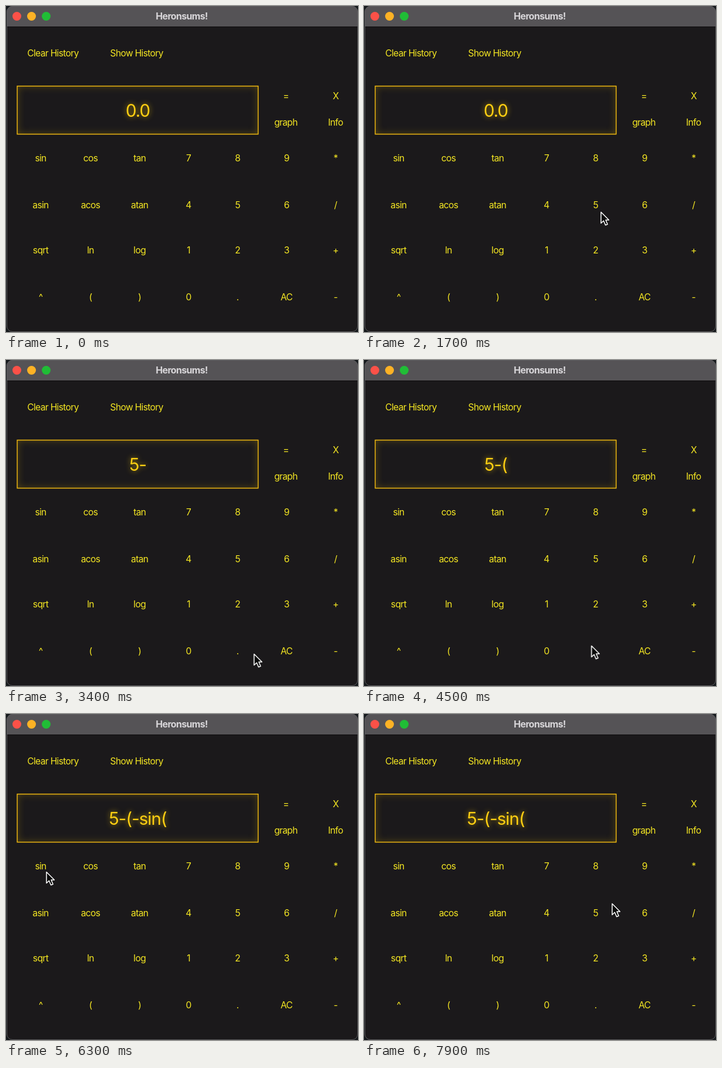
An HTML page that plays this animation: 600 by 556 pixels, repeating every 8 s.

```html
<!DOCTYPE html>
<html lang="en">
<head>
<meta charset="utf-8">
<title>Calculator</title>
<style>
  html, body { margin: 0; width: 100%; height: 100%; overflow: hidden; background: #14181b; }
  body { position: relative; font-family: Inter, Roboto, sans-serif; font-feature-settings: "calt" 0; }
  svg { position: absolute; left: 0; top: 0; display: block; overflow: hidden; }
  text { text-anchor: middle; }
  .title { font-size: 16px; font-weight: 700; letter-spacing: -.7px; fill: #d8d6d9; }
  .key { font-size: 15.6px; letter-spacing: -.67px; fill: #f5e722; }

  .screen {
    position: absolute; left: 19px; top: 136px; width: 411px; height: 83px;
    overflow: hidden; box-shadow: inset 0 0 14px rgba(255, 205, 0, .28);
  }
  .strip { animation: typing 8s step-end infinite; }
  .strip div {
    height: 83px; line-height: 84px; text-align: center;
    font-size: 29.5px; letter-spacing: -1px; color: #ffcf12;
    text-shadow: 0 0 10px rgba(255, 210, 0, .65);
  }
  @keyframes typing {
    0%      { transform: translateY(0); }
    23.75%  { transform: translateY(-83px); }
    36.25%  { transform: translateY(-166px); }
    50%     { transform: translateY(-249px); }
    63.75%  { transform: translateY(-332px); }
    78.75%, 100% { transform: translateY(-415px); }
  }

  .cursor { animation: travel 8s infinite, appear 8s step-end infinite; }
  @keyframes appear {
    0% { opacity: 0; }
    18.75%, 100% { opacity: 1; }
  }
  @keyframes travel {
    0%, 18.75% { transform: translate(422px, 362px); animation-timing-function: ease-out; }
    21.25%, 27.5% { transform: translate(404px, 351px); animation-timing-function: ease-in-out; }
    33.75%, 38.75% { transform: translate(566px, 503px); animation-timing-function: ease-in; }
    42.5%   { transform: translate(424px, 501px); animation-timing-function: ease-out; }
    47.5%, 52.5% { transform: translate(152px, 501px); animation-timing-function: ease-in; }
    56.25%  { transform: translate(387px, 487px); animation-timing-function: ease-out; }
    61.25%, 65% { transform: translate(566px, 501px); animation-timing-function: ease-in; }
    70%     { transform: translate(173px, 357px); animation-timing-function: ease-out; }
    75%, 87.5% { transform: translate(69px, 269px); animation-timing-function: ease-in-out; }
    98.75%, 100% { transform: translate(423px, 323px); }
  }
</style>
</head>
<body>
<svg width="600" height="556">
  <clipPath id="window"><rect x="1" y="0" width="599" height="556" rx="10"/></clipPath>
  <g clip-path="url(#window)">
    <rect width="600" height="556" fill="#1b191b"/>
    <rect width="600" height="35" fill="#555356"/>
    <rect y="35" width="600" height="1" fill="#0b0a0b"/>
  </g>
  <rect x="1.5" y=".5" width="598" height="555" rx="9.5" fill="none" stroke="#5c5b5e"/>
  <circle cx="18.5" cy="17.5" r="7.5" fill="#fc5148"/>
  <circle cx="43.5" cy="17.5" r="7.5" fill="#fdb225"/>
  <circle cx="68.5" cy="17.5" r="7.5" fill="#20bd36"/>
  <text class="title" x="299.5" y="22.5">Heronsums!</text>
  <g id="keys"></g>
  <rect x="19.1" y="136.6" width="410.7" height="82" fill="none" stroke="#e8b212" stroke-width="1.5"/>
</svg>

<div class="screen">
  <div class="strip">
    <div>0.0</div>
    <div>5</div>
    <div>5-</div>
    <div>5-(</div>
    <div>5-(-</div>
    <div>5-(-sin(</div>
  </div>
</div>

<svg width="600" height="556">
  <path class="cursor" d="M0 .5V19.5L4.4 15.3L7.6 22.8L11.1 21.3L8 14H13.4Z"
        fill="#0a0a0a" stroke="#fff" stroke-width="1.5" stroke-linejoin="round"/>
</svg>

<script>
  const keys = document.getElementById("keys");

  function addKey(label, x, y) {
    const key = document.createElementNS("http://www.w3.org/2000/svg", "text");
    key.setAttribute("class", "key");
    key.setAttribute("x", x);
    key.setAttribute("y", y);
    key.textContent = label;
    keys.append(key);
  }

  const columns = [59, 144, 227.7, 311, 394.7, 478.2, 561.8];
  const rows = [
    [265, "sin cos tan 7 8 9 *"],
    [345, "asin acos atan 4 5 6 /"],
    [422, "sqrt ln log 1 2 3 +"],
    [502, "^ ( ) 0 . AC -"],
  ];
  for (const [y, labels] of rows) {
    labels.split(" ").forEach((label, i) => addKey(label, columns[i], y));
  }

  addKey("Clear History", 80, 86);
  addKey("Show History", 222.7, 86);
  addKey("=", 477, 159);
  addKey("X", 562, 158.5);
  addKey("graph", 477, 203.5);
  addKey("Info", 561.7, 203.5);
</script>
</body>
</html>
```
